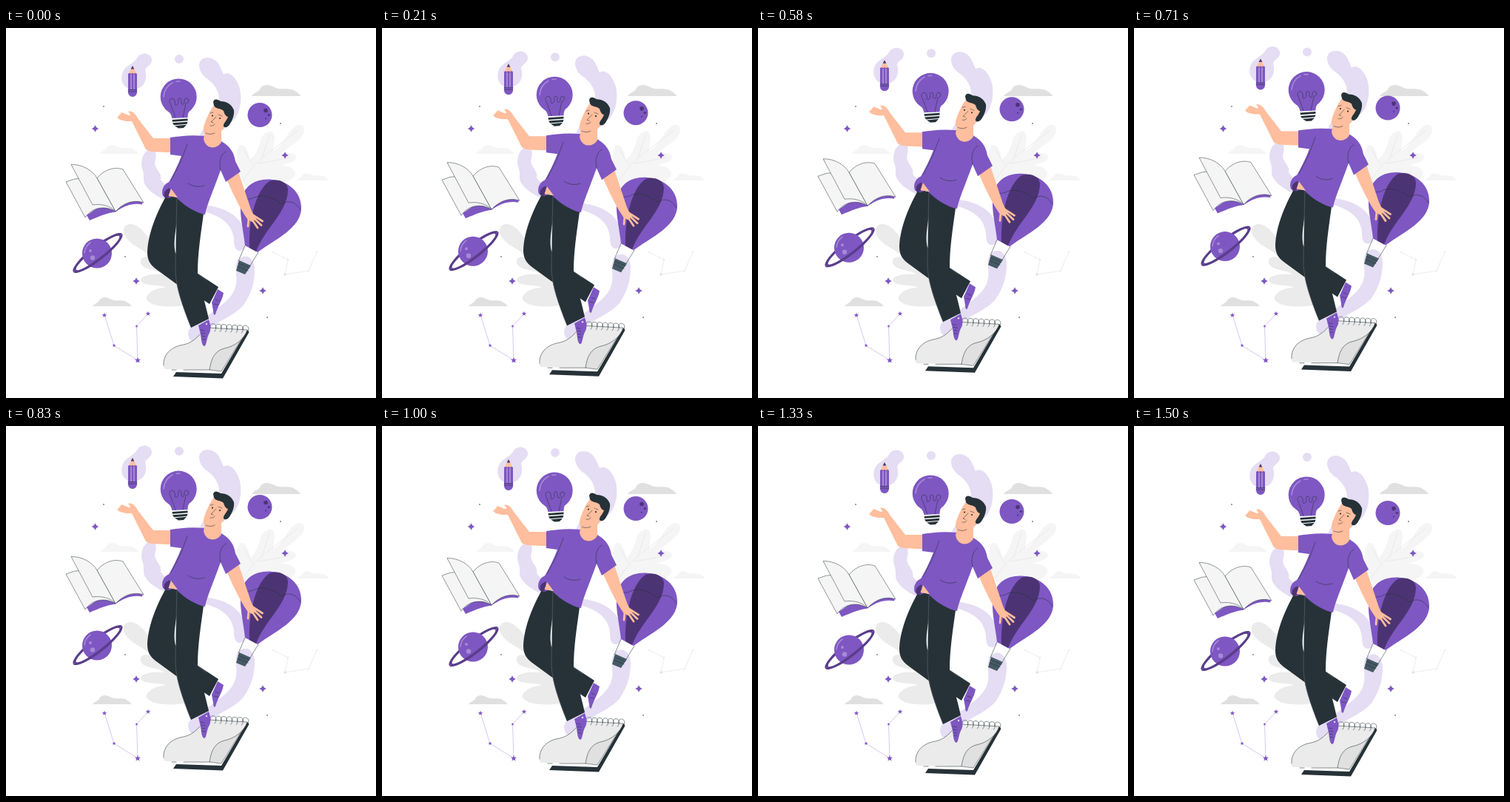
Write an HTML page that moves like this. It is 500 by 500 pixels and loops after 1540 ms.

```html
<!DOCTYPE html>
<html lang="en">
<head>
<meta charset="utf-8">
<title>Floating ideas</title>
<style>
  html, body { margin: 0; width: 100%; height: 100%; overflow: hidden; background: #fff; }
  svg { display: block; width: 100%; height: 100%; }
  .p { fill: #7e57c2; }
  .d { fill: #4c3474; }
  .k { fill: #263238; }
  .s { fill: #ffbe9d; }
  .b { fill: #e5ddf3; }
  .page { fill: #f5f5f5; stroke: #263238; stroke-width: .5; }
  .line { fill: none; stroke: #263238; stroke-width: .55; stroke-linecap: round; }
  .glow { fill: none; stroke: #a68ad6; stroke-width: 1.6; stroke-linecap: round; }
  .fingers { fill: none; stroke: #ffbe9d; stroke-width: 2.8; stroke-linecap: round; }
</style>
</head>
<body>
<svg viewBox="0 0 500 500">
  <defs>
    <path id="cloud" d="M0 0C4-6 10-5 12-11C18-18 26-14 33-11C40-8 52-12 58-7Q64-4 66 0Z"/>
    <path id="spark" d="M0-5Q1-1 5 0Q1 1 0 5Q-1 1-5 0Q-1-1 0-5Z"/>
    <path id="star" d="M0-4L1.2-1.3L4-1.2L1.8.7L2.5 3.5L0 2L-2.5 3.5L-1.8.7L-4-1.2L-1.2-1.3Z"/>
  </defs>

  <g id="backdrop">
    <path fill="#f5f5f5" d="M325 215C312 195 308 170 316 158C324 156 328 168 330 178C338 172 342 160 345 148C352 138 363 136 363 148C362 158 360 164 362 166C375 158 380 140 392 132C402 128 406 136 401 144C395 155 378 162 370 172C380 168 392 168 392 175C390 182 378 182 372 186C382 186 392 190 391 198C386 210 350 222 325 215Z"/>
    <path fill="none" stroke="#e6e6e6" stroke-width=".8" d="M320 207C335 180 360 165 395 138M334 186L321 165M346 176L356 145M340 183Q362 180 384 175"/>
    <path fill="#ebebeb" d="M245 360C240 335 228 318 205 300C195 288 185 268 170 265C158 264 156 275 163 284C170 295 190 300 196 311C190 308 180 308 182 318C186 328 206 326 214 333C200 331 182 334 182 341C184 350 210 346 216 351C205 350 188 358 190 367C198 380 240 378 258 370Z"/>
    <g fill="#e0e0e0">
      <use href="#cloud" x="332" y="92"/>
      <use href="#cloud" transform="translate(117 376) scale(.8)"/>
    </g>
    <g fill="#f5f5f5">
      <use href="#cloud" transform="translate(127 170) scale(.79)"/>
      <use href="#cloud" transform="translate(393 206) scale(.66)"/>
    </g>
    <g fill="none" stroke-width=".6">
      <path stroke="#b9a3de" d="M133 388L146 429L178 449L176.500 403L192 386"/>
      <path stroke="#e0e0e0" d="M361 303L381 313L377 333L409 328L420 303"/>
    </g>
  </g>

  <g id="float">
    <g class="b">
      <path d="M178 39C183 32 195 33 197 42C198 51 189 51 188 57C192 70 186 82 173 83C160 84 154 72 157 62C160 50 172 50 178 39Z"/>
      <circle cx="234" cy="42" r="6"/>
      <path d="M261 52C260 42 270 38 278 41C288 45 290 54 294 63C302 57 312 68 316 82C319 96 317 112 309 123L280 150L262 146Q265 137 274 128L288 97C288 86 283 78 275 71Q262 63 261 52Z"/>
      <path d="M200 163C186 163 181 178 184 190C188 200 184 206 188 212C200 230 225 238 268 248C296 256 306 268 308 285C308 295 310 301 316 301C325 300 324 290 323 278C318 250 290 242 268 239C240 232 216 215 209 205C212 195 198 190 202 178Q204 169 200 163Z"/>
      <path d="M316 311C326 304 336 312 336 327C336 342 332 358 322 373C310 389 285 396 270 410C262 424 250 428 247 418C243 405 255 400 268 392C290 376 306 365 310 350C315 335 305 322 316 311Z"/>
    </g>

    <g id="pencil">
      <path class="s" d="M171 51L177 63H165Z"/>
      <path class="d" d="M171 51L173.300 55.500H168.700Z"/>
      <path class="p" d="M165 62Q167 60 169 62Q171 60 173 62Q175 60 177 62V87A6 6 0 0 1 165 87Z"/>
      <path stroke="#fff" stroke-width=".6" d="M169 63V83M173 63V83"/>
      <path class="line" d="M165 83.500H177M165 86H177"/>
    </g>

    <g id="bulb">
      <circle class="p" cx="233.200" cy="93" r="24.500"/>
      <path class="p" d="M214 108Q223 114 224.500 122L245.500 121Q245 113 252 108Z"/>
      <path class="line" d="M229 121L222 102C219 98 223 93 227 96C230 101 226 106 231 104C235 101 230 95 235 95C239 96 235 101 238 103C243 104 239 97 243 95C249 95 247 101 243 102L239 121"/>
      <path class="glow" d="M213 93Q214 80 225 74M230 72.300L235 72"/>
      <path class="k" d="M224.500 124L245.500 122.500V125.200L225 126.700ZM225 128.300L245.500 126.800L244.500 129.700L227 131.200ZM228 132.300L244 130.800L240 135L233 135.500Z"/>
    </g>

    <g id="moon">
      <circle class="p" cx="343" cy="117.500" r="16.500"/>
      <g class="d">
        <circle cx="351" cy="111.500" r="2.800"/>
        <circle cx="355.300" cy="117.500" r="1.600"/>
        <circle cx="351" cy="122.500" r="1"/>
      </g>
    </g>

    <g id="balloon">
      <path class="line" d="M323 294L314 315M341 303L330 321"/>
      <path class="p" d="M323 294C321 275 316 255 317 240C318 215 335 204 356 204.500C382 206 399 222 399 243C399 270 365 285 340 303Z"/>
      <path class="d" d="M356 207C366 203 381 207 381 219C380 250 350 270 338 302L329 297C328 260 337 220 356 207Z"/>
      <path class="line" d="M317 226C325 234 333 231 338 228C350 225 361 229 372 238C384 231 393 237 398 246"/>
      <path fill="#455a64" d="M315 314L331 321L323 333L311 328Z"/>
      <path class="line" d="M314 318L329 324M313 322L327 328"/>
    </g>

    <g id="book">
      <path class="p" d="M109 253L113 260C127 254 137 250 148 248.500C160 240 172 236 184 238.500L185 235C172 231 160 235 148 247L128 240Z"/>
      <path class="page" d="M81 208Q92 203 103 203L123 203L148 248C136 240 117 241 107 256Z"/>
      <path class="page" d="M123 203C133 191 147 187 158 191L186 236C174 232 160 235 148 248Z"/>
      <path class="page" d="M88 184.500C103 184 118 193 123 203L148 248C142 241 130 237 117 239Z"/>
    </g>

    <g id="planet">
      <path class="ring"/>
      <circle class="p" cx="123" cy="304.500" r="20"/>
      <path class="ring" clip-path="inset(50% 0 0 0)"/>
      <path class="glow" d="M106 304Q107 295 114 290"/>
      <circle cx="114" cy="301" r="2" fill="#a68ad6"/>
      <circle cx="117" cy="310.500" r="3.200" fill="#a68ad6"/>
    </g>

    <g id="notebook">
      <path class="k" d="M226 471L230 465L291 467L326 408L328.500 411L293 473.500Z"/>
      <path fill="#e0e0e0" stroke="#263238" stroke-width=".5" d="M326 408L291 464L275 462L270 445L295 430Z"/>
      <path fill="#ebebeb" d="M213 456C212 440 225 430 240 428C258 424 262 410 274 405L326 408C322 420 310 430 295 433C280 437 277 450 275 462L216 461Q212 460 213 456Z"/>
      <path class="line" d="M213 456C212 440 225 430 240 428C258 424 262 410 274 405L326 408C322 420 310 430 295 433C280 437 277 450 275 462L240 462M230 462H224"/>
      <path id="coil" class="line"/>
    </g>

    <g id="man">
      <path class="p" d="M278 371L286 353L294 358C292 369 286 376 283 387C281 389 280 386 280 382Z"/>
      <path class="line" d="M281 373L286 374M283 367L288 369"/>
      <path class="k" d="M217 226C205 247 192 276 191 303C191 314 195 320 203 326L229 345L260 363L275 373L287 350L258 331L236 310L229 304C227 296 227 285 231 262V229Z"/>
      <path class="p" d="M260 402L274 394C277 402 277 408 275 412C271 418 271 430 268 430C264 429 264 420 263 414Z"/>
      <path class="line" d="M263 408L268 409M263.500 412L269 413M264 416L269 417M265 420L269 421"/>
      <circle cx="271" cy="400" r="1.200" fill="#e5ddf3"/>
      <path class="k" d="M231 228C245 240 258 249 267 251C263 280 259 305 259 332C264 355 270 375 274 393L250 405C240 380 229 350 229 330C230 300 230 260 231 228Z"/>
      <path fill="none" stroke="#6b777d" stroke-width=".5" d="M231 229C230 270 229 300 229 330C230 350 238 375 249 402M259 332L271 341"/>
      <path class="p" d="M223 207C213 210 209 219 212 227L219 230L230 226Z"/>
      <path class="d" d="M222 216C215 218 212 223 214 229L220 229Z"/>
      <path class="s" d="M224 149L199 149L178 122C175 116 170 111 165 113C168 116 169 118 166 118L156 114L154 117L150 121L154 124L162 126L170 126L188 162C190 167 197 168 224 168Z"/>
      <path class="s" d="M298 204L314 194L331 245C333 250 336 254 338 258L332 262L326 258C316 244 305 220 298 204Z"/>
      <path class="fingers" d="M334 253L346.500 261M334 256L345 266.500M332 258L340 270M328 257L327 268"/>
      <path class="p" d="M222 148C235 146 250 144 269 146C272 158 285 160 291 153C303 160 308 168 310 180L317 194L297 208L290 192C280 220 271 240 269 252C258 250 243 242 231 230L218 212C225 200 232 186 237 173L222 171Z"/>
      <path class="s" d="M223 217L219.500 227L232 229Z"/>
      <path class="line" d="M246 210Q256 217 268 213M290 192C287 180 291 170 297 167M245 157L236 181L223 206"/>
      <path class="s" d="M269 139L267 150C270 165 286 164 291 154V135Z"/>
      <path class="s" d="M282 103L276 112C271 122 266 132 267 139C270 146 280 146 286 144L295 135C301 128 302 120 300 112L290 104Z"/>
      <path class="k" d="M280 100C281 95 286 96 290 99C298 99 305 103 308 111C309 118 305 127 301 132Q297 136 294 133C293 129 298 126 300 120C296 119 295 115 294 112C290 108 284 110 281 105Z"/>
      <path class="line" d="M284 120L277 127L280 128M276 132Q280 133 282 130M276 115L280 114M287 117L292 119M270 142Q276 145 282 142"/>
      <circle class="k" cx="279" cy="118.500" r="1.100"/>
      <circle class="k" cx="289" cy="122" r="1.100"/>
    </g>
  </g>
</svg>
<script>
  const byId = id => document.getElementById(id);
  const backdrop = byId('backdrop'), float = byId('float');

  function addMarks(shape, color, marks) {
    for (const [x, y, size = 1] of marks) {
      backdrop.insertAdjacentHTML('beforeend',
        `<use href="#${shape}" fill="${color}" transform="translate(${x} ${y}) scale(${size})"/>`);
    }
  }
  addMarks('spark', '#7e57c2', [[120.5, 136], [377, 172], [176, 342], [347, 355]]);
  addMarks('star', '#7e57c2', [[133, 388, .8], [146, 429, .6], [178, 449], [176.5, 403, .5], [192, 386, .8]]);
  addMarks('star', '#e0e0e0', [[361, 303, .3], [381, 313, .4], [377, 333, .6], [409, 328, .3], [420, 303, .3]]);
  for (const [x, y] of [[132, 106], [371, 129], [161, 309], [353, 391]]) {
    backdrop.insertAdjacentHTML('beforeend', `<circle class="k" cx="${x}" cy="${y}" r=".8"/>`);
  }

  // The whole ring goes behind the planet, its near half in front.
  const [back, front] = document.querySelectorAll('.ring');
  const half = sweep => `M-42 0A42 10 0 0 ${sweep} 42 0L37 0A37 6.5 0 0 ${1 - sweep}-37 0Z`;
  back.setAttribute('d', half(1));
  front.setAttribute('d', half(0));
  front.removeAttribute('clip-path');
  for (const ring of [back, front]) {
    ring.setAttribute('fill', '#5a3d8b');
    ring.setAttribute('transform', 'translate(124 304) rotate(-38)');
  }

  let coil = '';
  for (let i = 0; i < 7; i++) {
    coil += `M${276 + i * 7.3} ${405 + i * .4}c-2-7 8-7 8-1q0 4-2 6`;
  }
  byId('coil').setAttribute('d', coil);

  const LOOP = 1540, PEAK = 710, LAND = 1500, HEIGHT = 9.4;
  function draw(now) {
    const t = now % LOOP;
    const lift = HEIGHT * Math.max(0, Math.min(t / PEAK, (LAND - t) / (LAND - PEAK)));
    float.setAttribute('transform', `translate(0 ${-lift})`);
    requestAnimationFrame(draw);
  }
  draw(performance.now());
</script>
</body>
</html>
```
